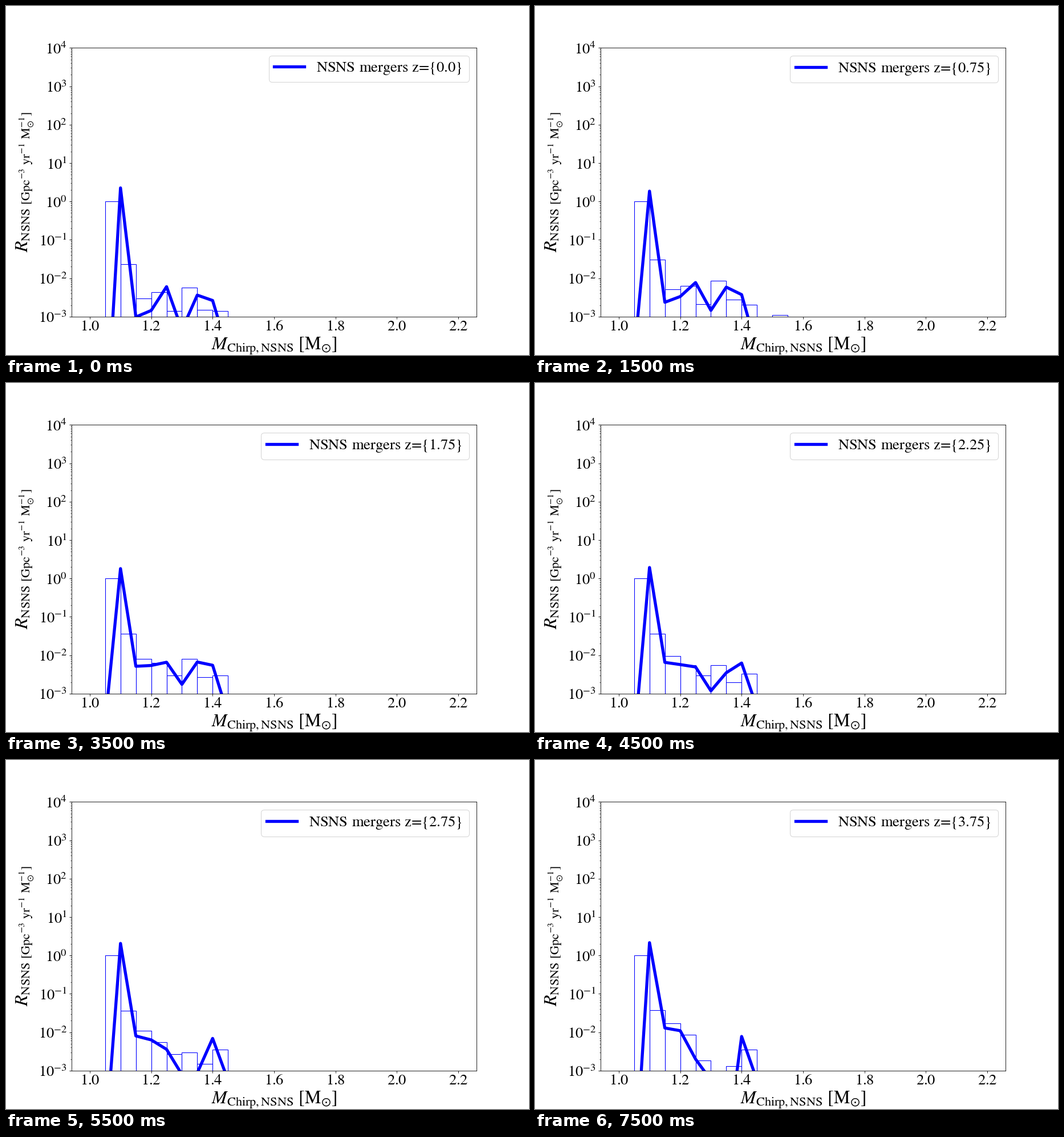
Animation of 917x611 px, one loop 8 s. Source, as a matplotlib script:

```python
import numpy as np
import matplotlib.pyplot as plt
from matplotlib.animation import FuncAnimation
from matplotlib.ticker import FuncFormatter, LogLocator, MultipleLocator

plt.rcParams.update({
    "font.family": "Liberation Serif",
    "mathtext.fontset": "stix",
    "font.size": 25,
})

W, H, DPI = 917, 611, 76.4
STEPS, STEP_MS, DZ = 16, 500, 0.25
BIN, FLOOR, BASE = 0.05, -3, 1e-5
GAP = r"\hspace{0.38}"


def drift(start, end, arch=0, wave=0):
    """A path from start to end, bent by a half and a full sine."""
    def at(t):
        s = t / (STEPS - 1)
        return (start + (end - start) * s
                + arch * np.sin(np.pi * s) + wave * np.sin(2 * np.pi * s))
    return at


# log10 of the rate in each mass bin
BARS = {
    1.05: drift(0, 0),
    1.10: drift(-1.63, -1.42, 0.08, 0.03),
    1.15: drift(-2.52, -1.77, 0.07, 0.04),
    1.20: drift(-2.37, -2.06, 0, 0.12),
    1.25: drift(-2.85, -2.74, 0.27),
    1.30: drift(-2.24, -3.3, 0.65),
    1.35: drift(-2.83, -2.88, 0.25, 0.15),
    1.40: drift(-2.85, -2.46, 0.145),
    1.50: drift(-3.15, -4.5, 0.6, 0.12),
}

# log10 of the line's vertices
CURVE = {
    1.10: drift(0.353, 0.333, -0.08, -0.035),
    1.15: drift(-3.01, -1.89, 0.19, 0.05),
    1.20: drift(-2.84, -1.96, 0.14, 0.11),
    1.25: drift(-2.22, -2.7, 0.25, 0.06),
    1.30: drift(-3.34, -3.25, 0.5, 0.2),
    1.35: drift(-2.44, -5.1, 1.55, -0.18),
    1.40: drift(-2.58, -2.11, 0.1),
    1.45: drift(-3.91, -3.25, 0.08, -0.12),
    1.50: drift(-3.4, -4.8, 0.75, 0.19),
}

# Mass at which the left flank crosses the floor
FOOT = drift(1.0752, 1.0733, -0.0138, -0.005)


def curve(t):
    logs = [path(t) for path in CURVE.values()]
    start = logs[0] - (logs[0] - FLOOR) * BIN / (1.10 - FOOT(t))
    return [1.05, *CURVE], 10.0 ** np.array([start, *logs])


def label(t):
    tight = r"\hspace{-0.2}"
    # the closing space keeps the last brace's side bearing
    return (rf"$\mathrm{{NSNS{GAP}mergers{GAP}"
            rf"z{tight}={tight}\{{{DZ * t}\}}}}$ ")


fig, ax = plt.subplots(figsize=((W + 1e-6) / DPI, (H + 1e-6) / DPI), dpi=DPI)
ax.set_yscale("log")

bars = ax.bar(list(BARS), 1, width=BIN, bottom=BASE, align="edge",
              fill=False, edgecolor="blue", linewidth=1)
line, = ax.plot(*curve(0), color="blue", linewidth=5, label=label(0))
legend = ax.legend(loc="upper right", borderpad=0.36)

ax.set_xlim(0.94, 2.26)
ax.set_ylim(10.0 ** FLOOR, 1e4)
ax.xaxis.set_major_locator(MultipleLocator(0.2))
ax.xaxis.set_major_formatter(FuncFormatter(lambda x, _: f"${x:.1f}$"))
ax.yaxis.set_major_locator(LogLocator(numticks=20))
ax.yaxis.set_minor_locator(LogLocator(subs=range(2, 10), numticks=100))
ax.yaxis.set_major_formatter(
    FuncFormatter(lambda y, _: f"$10^{{{round(np.log10(y))}}}$"))
ax.set_xlabel(r"$M_{\mathrm{Chirp,NSNS}}\ \mathrm{[M_{\odot}]}$", fontsize=30)
units = GAP.join(["NSNS", "[Gpc^{-3}", "yr^{-1}", r"M_{\odot}^{-1}]"])
ax.set_ylabel(rf"$R_{{\mathrm{{{units}}}}}$", fontsize=30)


def update(t):
    for bar, path in zip(bars, BARS.values()):
        bar.set_height(10.0 ** path(t) - BASE)
    line.set_data(*curve(t))
    legend.get_texts()[0].set_text(label(t))
    return [*bars, line, legend]


anim = FuncAnimation(fig, update, frames=STEPS, interval=STEP_MS,
                     repeat=True, repeat_delay=0, blit=False)
plt.show()
```
